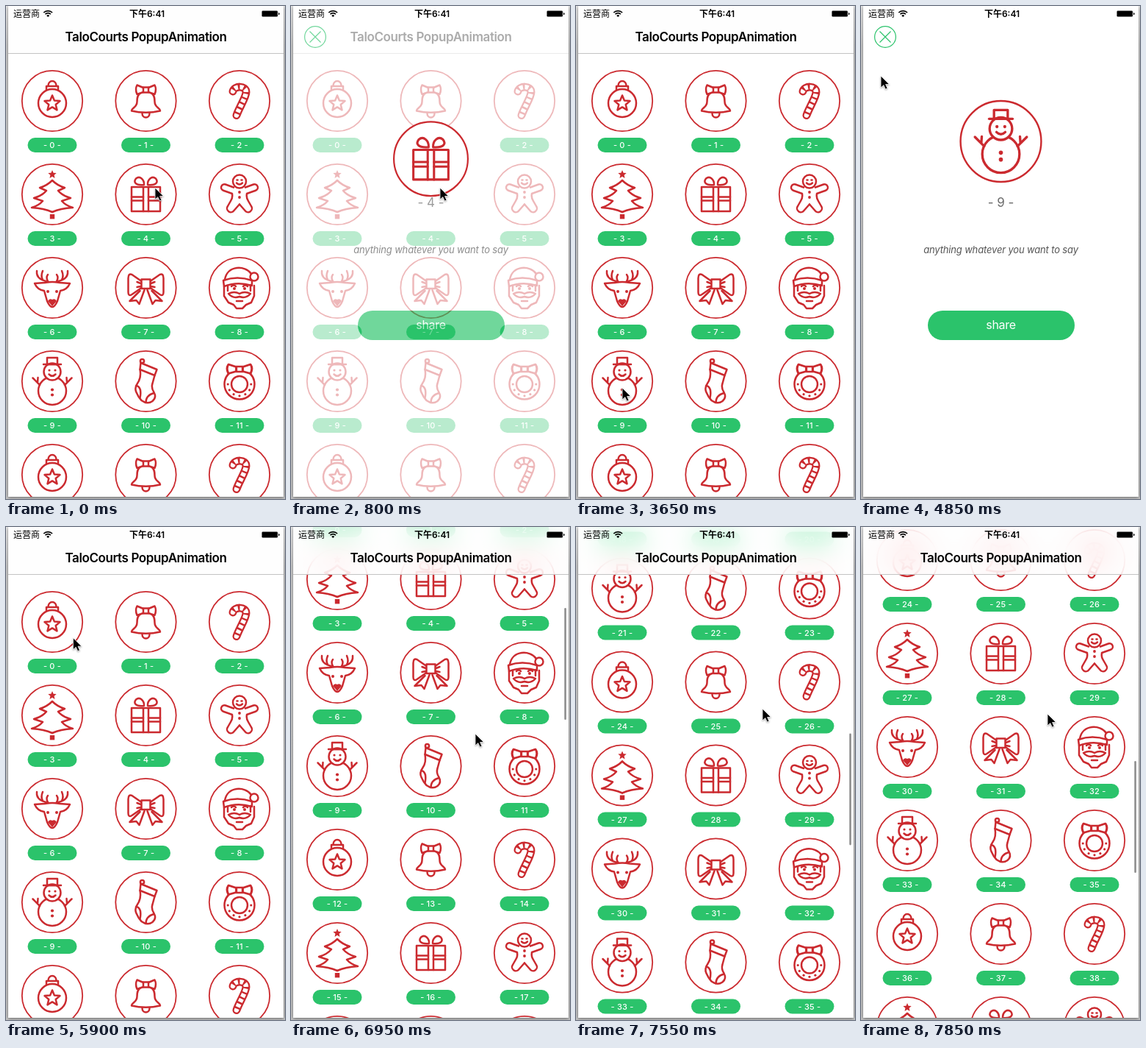
Recreate the animation shown at these times as an HTML page. Size 380x670 px, loop 8 s.

```html
<!DOCTYPE html>
<html lang="zh">
<head>
<meta charset="utf-8">
<title>Popup animation</title>
<style>
  html, body { margin: 0; width: 100%; height: 100%; overflow: hidden; }
  body { position: relative; background: linear-gradient(#ececec, #cfcfcf 8%, #c4c4c4); }
  .layer { position: absolute; left: 3px; top: 0; width: 375px; height: 667px; overflow: hidden; }
  #grid { background: #fff; box-shadow: 0 1px 4px rgba(0, 0, 0, .5); }
  #nav { height: 64px; background: rgba(254, 254, 254, .78); backdrop-filter: blur(16px) saturate(1.7); }
  text { font-family: Inter, "Noto Sans CJK SC", "Noto Sans CJK", sans-serif; text-anchor: middle; }
  .icon { fill: none; stroke: #cb2a2f; stroke-width: 2.5; stroke-linejoin: round; stroke-linecap: round; }
  .icon .solid { fill: #cb2a2f; stroke: none; }
  .icon .paper { fill: #fff; }
  .tag { font-size: 11px; font-weight: 500; letter-spacing: .2px; fill: #fff; }
</style>
</head>
<body>
<svg id="grid" class="layer" viewBox="3 0 375 667">
  <defs id="defs"></defs>
  <g id="cells"></g>
  <rect id="bar" x="372.3" width="2.6" height="152" rx="1.3" fill="#8e8e8e"/>
</svg>
<div id="nav" class="layer"></div>
<svg class="layer" viewBox="3 0 375 667">
  <path d="M3 64.5H378" stroke="#c4c4c4"/>
  <text x="190.5" y="48" font-size="17" font-weight="600" letter-spacing="-.4">TaloCourts PopupAnimation</text>
  <g id="popup">
    <rect x="3" width="375" height="667" fill="#fff"/>
    <g fill="none" stroke="#2bc36b" stroke-width="1.2">
      <circle cx="33" cy="42" r="14.4"/>
      <path d="M25.5 34.5l15 15m0-15l-15 15"/>
    </g>
    <text id="number" x="190.5" y="273" font-size="17" fill="#6a6a6a"></text>
    <text x="190.5" y="336" font-size="13" font-style="italic" letter-spacing="-.16" fill="#555">anything whatever you want to say</text>
    <rect x="91" y="414" width="200" height="40" rx="20" fill="#2bc36b"/>
    <text x="190.5" y="439" font-size="16" letter-spacing="-.3" fill="#fff">share</text>
  </g>
  <use id="hero"/>
  <g id="status">
    <text x="10" y="14.5" font-size="12" style="text-anchor:start">运营商</text>
    <path d="M51.3 9a8.3 8.3 0 0 1 11.8 0M53.5 11.2a5.2 5.2 0 0 1 7.4 0" fill="none" stroke="#000" stroke-width="1.7"/>
    <path d="M57.2 15l-2-2.1a2.8 2.8 0 0 1 4 0z"/>
    <text x="192" y="14.5" font-size="12" font-weight="600">下午6:41</text>
    <rect x="348.5" y="6.5" width="21.5" height="8" rx="1.3"/>
    <path d="M371 9q1.6 0 1.6 1.6t-1.6 1.6z"/>
  </g>
  <path id="cursor" d="M0 0V16L3.8 12.6 6.3 18 9 16.9 6.6 11.5H11.6Z" stroke="#fff" stroke-width=".8" style="filter:drop-shadow(0 1px 1px rgba(0,0,0,.35))"/>
</svg>
<script>
const $ = id => document.getElementById(id);
const line = (d, cls = '') => `<path d="${d}" class="${cls}"/>`;
const both = (d, cls = '') => line(d, cls) + `<g transform="scale(-1 1)">${line(d, cls)}</g>`;
const ring = (x, y, r, cls = '') => `<circle cx="${x}" cy="${y}" r="${r}" class="${cls}"/>`;
const dot = (x, y, r = 1.6) => ring(x, y, r, 'solid');
const box = (x, y, w, h, cls = '') => `<rect x="${x}" y="${y}" width="${w}" height="${h}" class="${cls}"/>`;
const star = (y, r, cls) => line('M' + Array.from({length: 10}, (_, i) => {
  const a = i * Math.PI / 5, k = i % 2 ? r * .45 : r;
  return `${(k * Math.sin(a)).toFixed(1)} ${(y - k * Math.cos(a)).toFixed(1)}`;
}).join('L') + 'Z', cls);
const smallBow = y => `<g transform="translate(0 ${y})">` +
  both('M3.5-3L12-6.5Q15-1 12 6L3.5 3', 'paper') + box(-3.5, -3.5, 7, 7, 'paper') + '</g>';

const cane = 'M-9-13C-7-21 9-21 9-12C9-5 0 8-4 19.5';
const icons = [
  // bauble
  ring(0, 3, 19) + line('M-8-15V-20H8V-15M-5.5-21a5.5 6 0 0 1 11 0') + star(3.5, 11),
  // bell
  line('M-7-11C-12-8-12-3-12 1C-12 9-19 9-19.5 13.5Q0 18 19.5 13.5C19 9 12 9 12 1C12-3 12-8 7-11') +
    line('M-5 17a5 5.5 0 0 0 10 0') + smallBow(-15),
  // candy cane
  `<path d="${cane}" stroke-width="11"/><path d="${cane}" stroke="#fff" stroke-width="6.4"/>
   <path d="${cane}" stroke-width="8" stroke-dasharray="2.6 4.8" stroke-dashoffset="-2" stroke-linecap="butt"/>`,
  // tree
  star(-27, 6, 'solid') + both('M0-19Q7-12 17-9L8-5Q14 2 25 5L13 9Q18 15 28 18Q11 19 0 24') +
    box(-3.2, 27, 6.4, 6.4, 'solid'),
  // gift
  box(-19.5, -10, 39, 33) + line('M-3.5-10V23M3.5-10V23') + both('M3.5 3.5H19.5M3.5 8.5H19.5') +
    both('M2.5-13C15-12 17-17 13.5-21.5C8-26 2-20 2.5-13Z'),
  // gingerbread man
  ring(0, -17.5, 9) +
    both('M8-9.5L19-13.5a4.4 4.4 0 0 1 3 8.3L10-1Q9 5 12 9L16 16a4.7 4.7 0 0 1-8.5 6L0 13.5') +
    both('M2.5-19.5h1') + line('M-4-15.5Q0-11.5 4-15.5') + dot(0, -3, 1.9) + dot(0, 4, 1.9),
  // reindeer
  line('M-10-7Q0-9 10-7L24-6Q20 3 11 4L7 18Q0 34-7 18L-11 4Q-20 3-24-6Z') +
    both('M5-8C14-10 22-13 21-23M13-11Q16-16 13-23M6-9Q9-14 6-18') + dot(-6, 5, 2) + dot(6, 5, 2) +
    line('M-6 18Q-4 14 0 16Q4 14 6 18L0 25Z', 'solid'),
  // ribbon
  both('M6-9L19-18Q24-20 24-13V6Q24 12 19 9L6 0M7-6l5-2M7-2l5 1') +
    both('M8 4L22 18L13 17L9 22L2 3') + box(-6, -11.5, 12, 12.5, 'paper'),
  // bearded man in a cap
  line('M-20-11C-17-31 8-31 16-19') + line('M-22-10Q-3-17 17-10V-3Q-3-9-21-2Z') + ring(20, -15, 5.5, 'paper') +
    line('M-21-2V11L-15 20L-8 23L-4 28H4L9 23L16 20L20 11V-3') +
    both('M0 8Q7 4 15 8Q9 15 0 12M5-2Q8-5 11-2') + line('M-4 18H4M-16-3V4M15-4V4') + dot(-7, 1, 2) + dot(7, 1, 2),
  // snowman
  ring(0, 13, 19) + ring(0, -13, 11.5, 'paper') + box(-7, -32, 14, 9) + line('M-12-23H12') +
    dot(-4, -15) + dot(4, -15) + line('M-4.5-9.5Q0-5 4.5-9.5') + dot(0, 11.5, 2.1) + dot(0, 18.5, 2.1) +
    both('M17 5L26.5-4.5M20 2L19.5-5'),
  // stocking
  line('M-7-25L15-16L12-8L-8-16Z') + ring(-5, -27.5, 2.6) +
    line('M-8-16Q-6-5-11 2Q-16 9-13 15Q-10 22-6 26Q2 32 9 27Q15 22 11 15Q7 9 9 3L12-8') +
    line('M-13 6Q-5 8-8 23M0 29Q0 19 11 16'),
  // wreath
  ring(0, 4, 20.5) + ring(0, 4, 11) +
    [0, 1, 2, 3, 4, 5, 6].map(i => {
      const a = i * Math.PI / 6;
      return dot(15.8 * Math.cos(a), 4 + 15.8 * Math.sin(a));
    }).join('') + `<g transform="translate(0 -16.5) scale(1.25 1)">${smallBow(0)}</g>`
];
$('defs').innerHTML = icons.map((art, i) =>
  `<g id="icon${i}" class="icon"><circle r="41.2" fill="#fff" stroke-width="1.8"/>${art}</g>`).join('');

const cellX = i => 63 + 127.5 * (i % 3), cellY = i => 129 + 127 * Math.floor(i / 3);
$('cells').innerHTML = Array.from({length: 45}, (_, i) =>
  `<g transform="translate(${cellX(i)} ${cellY(i)})"><use href="#icon${i % 12}" id="cell${i}"/>
   <rect x="-33.5" y="50" width="67" height="20" rx="10" fill="#2bc36b"/>
   <text class="tag" y="64">- ${i} -</text></g>`).join('');

const mix = (a, b, k) => a + (b - a) * k;
const ramp = (t, from, to) => Math.min(1, Math.max(0, (t - from) / (to - from)));
const ease = k => k * k * (3 - 2 * k);

// Linear interpolation through rows of [time, ...values].
function track(keys, t) {
  const n = keys.findIndex(k => k[0] > t);
  if (n <= 0) return keys[n ? keys.length - 1 : 0].slice(1);
  const a = keys[n - 1], b = keys[n], k = ramp(t, a[0], b[0]);
  return a.slice(1).map((v, i) => mix(v, b[i + 1], k));
}

const pointer = [
  [1300, 203, 247], [2000, 34, 44], [2750, 34, 44], [3350, 95, 402], [3650, 63, 519],
  [4600, 63, 519], [4850, 27, 95], [5000, 33, 38], [5650, 33, 38], [6600, 255, 466],
  [6750, 255, 466], [6800, 254, 446], [6950, 251, 281], [7100, 252, 240], [7550, 254, 247], [7850, 254, 254]
];
const scroll = [
  [6750, 0], [6800, 20], [6950, 185], [7100, 430], [7250, 640],
  [7400, 805], [7550, 934.5], [7700, 1030], [7850, 1100]
];
const popups = [
  {id: 4, open: [400, 1050], close: [2350, 2950]},
  {id: 9, open: [3850, 4400], close: [5050, 5700]}
];

function draw(now) {
  // The screen refreshes every 150 ms.
  const t = Math.floor((now % 8000 - 50) / 150) * 150 + 50;

  const [offset] = track(scroll, t);
  $('cells').setAttribute('transform', `translate(0 ${-offset})`);
  $('bar').setAttribute('y', 68 + offset * .2273);
  $('bar').style.opacity = offset > 0 ? 1 : 0;

  const {id, open, close} = popups[t < 3400 ? 0 : 1];
  const shown = ease(ramp(t, ...open) - ramp(t, ...close));
  popups.forEach(p => $('cell' + p.id).style.opacity = p.id === id && shown > 0 ? 0 : 1);
  $('popup').style.opacity = shown;
  $('number').textContent = `- ${id} -`;
  const hero = $('hero');
  hero.style.display = shown > 0 ? '' : 'none';
  hero.setAttribute('href', '#icon' + id);
  hero.setAttribute('transform', `translate(${mix(cellX(id), 190.5, shown)} ${mix(cellY(id), 184, shown)})
    scale(${mix(1, 4 / 3, shown)})`);

  $('cursor').setAttribute('transform', `translate(${track(pointer, t)})`);
  requestAnimationFrame(() => draw(performance.now() - start));
}
const start = performance.now();
draw(0);
</script>
</body>
</html>
```
